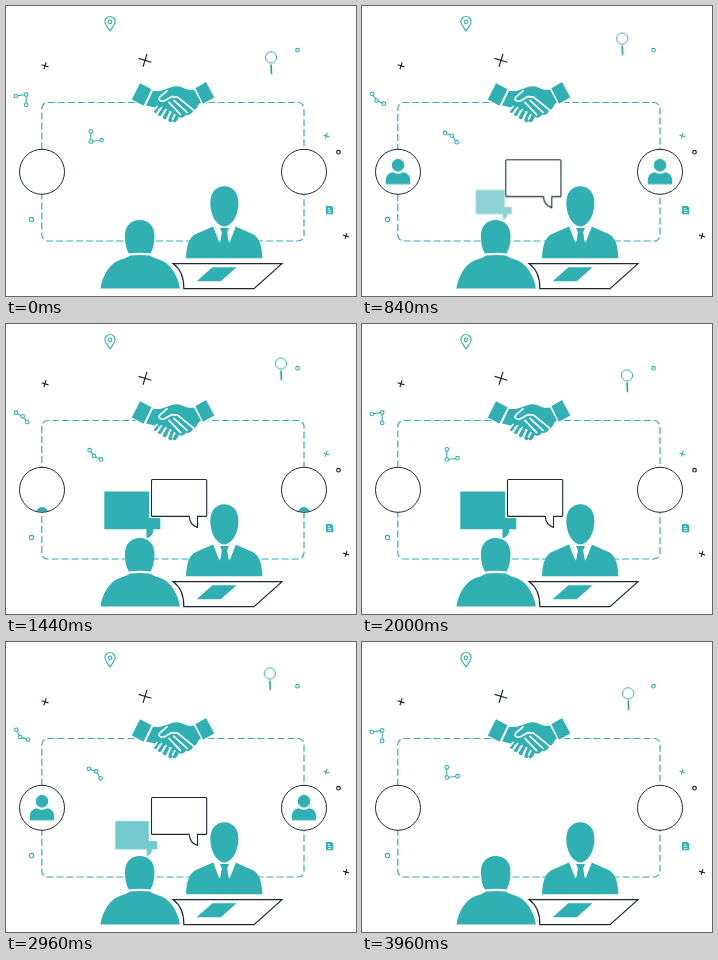
An HTML page for the animation above (4 s loop, 350 by 290 pixels).

```html
<!DOCTYPE html>
<html lang="en">
<head>
<meta charset="utf-8">
<title>Meeting</title>
<style>
  html, body { margin: 0; width: 100%; height: 100%; overflow: hidden; background: #fff; }
  svg { display: block; width: 350px; height: 290px; --teal: #31b0b3; --dark: #1d2a33; }
  .fill { fill: var(--teal); }
  .line { fill: none; stroke: var(--teal); }
  .ink { fill: none; stroke: var(--dark); }
  .white { fill: #fff; }
  .cut { fill: none; stroke: #fff; stroke-width: 1.7; stroke-linecap: round; stroke-linejoin: round; }

  .route { stroke-width: 1.2; stroke-dasharray: 7 3; animation: march 4s linear infinite; }
  @keyframes march { to { stroke-dashoffset: -40px; } }

  .member { animation: rise 2s -80ms cubic-bezier(.37, 0, .63, 1) infinite; }
  @keyframes rise {
    0%, 84%, 100% { transform: translateY(40px); }
    24%, 60% { transform: none; }
  }

  .reply { transform-origin: 141.5px 213.5px; animation: pop 4s cubic-bezier(.37, 0, .63, 1) infinite; }
  @keyframes pop {
    0%, 15.7%, 80.2%, 100% { transform: scale(.2); opacity: 0; }
    25.7%, 70.2% { transform: none; opacity: 1; }
  }

  .speech {
    animation: slide 4s cubic-bezier(.37, 0, .63, 1) infinite, show 4s linear infinite;
  }
  @keyframes slide {
    0%, 11%, 86.5%, 100% { transform: translate(-14px, -14px); }
    24%, 73.5% { transform: none; }
  }
  @keyframes show {
    0%, 11%, 86.5%, 100% { opacity: 0; }
    20%, 77.5% { opacity: 1; }
  }

  .orbit { animation: orbit 2s linear infinite; }
  @keyframes orbit {
    from { transform: translate(265px, 41.4px) rotate(0deg) translateY(10px) rotate(0deg); }
    to { transform: translate(265px, 41.4px) rotate(360deg) translateY(10px) rotate(-360deg); }
  }

  .nodes { marker: url(#node); animation: 1s cubic-bezier(.37, 0, .63, 1) infinite alternate; }
  .nodes.a { animation-name: bend-a; }
  .nodes.b { animation-name: bend-b; }
  @keyframes bend-a {
    from { d: path("M9.8 90 L20.2 88.4 L20.2 98.8"); }
    to { d: path("M10.3 87.8 L14.2 95 L22 97.6"); }
  }
  @keyframes bend-b {
    from { d: path("M84.8 125.3 L84.8 135.5 L95.5 134.2"); }
    to { d: path("M82.8 126.8 L90.2 129.4 L94.6 136.3"); }
  }
</style>
</head>
<body>
<svg viewBox="0 0 350 290">
  <defs>
    <marker id="node" markerUnits="userSpaceOnUse" markerWidth="6" markerHeight="6" refX="3" refY="3">
      <circle cx="3" cy="3" r="1.8" fill="#fff" stroke="#31b0b3" stroke-width="1.1"/>
    </marker>
    <clipPath id="disc"><circle r="22"/></clipPath>
    <path id="cross" d="M-1 0H1M0 -1V1" vector-effect="non-scaling-stroke"/>
    <circle id="ring" r="22.5"/>
    <path id="bust" d="M-6.3 -6.6A6.3 6.3 0 0 1 6.3 -6.6A6.3 6.3 0 0 1 -6.3 -6.6ZM-12.2 12.5V9C-12.2 3 -8 .6 -5 .6Q0 3.2 5 .6C8 .6 12.2 3 12.2 9V12.5Z"/>
  </defs>

  <rect class="line route" x="35.8" y="96.5" width="262.2" height="138.5" rx="6"/>
  <g transform="translate(36 165.8)">
    <use href="#ring" class="white"/>
    <g clip-path="url(#disc)"><g class="member fill"><use href="#bust"/></g></g>
    <use href="#ring" class="ink"/>
  </g>
  <g transform="translate(298 165.8)">
    <use href="#ring" class="white"/>
    <g clip-path="url(#disc)"><g class="member fill"><use href="#bust"/></g></g>
    <use href="#ring" class="ink"/>
  </g>

  <!-- Scattered icons -->
  <g class="line" stroke-width="1.1">
    <path d="M104 25C101.5 21 98.9 18.6 98.9 15.6A5.1 5.1 0 0 1 109.1 15.6C109.1 18.6 106.5 21 104 25Z"/>
    <circle cx="104" cy="15.8" r="1.8"/>
    <circle cx="291.5" cy="44.2" r="1.8"/>
    <circle cx="25.5" cy="213.6" r="2.2"/>
    <use href="#cross" transform="translate(320.3 129.8) rotate(17) scale(3)"/>
    <path class="nodes a" d="M9.8 90L20.2 88.4L20.2 98.8"/>
    <path class="nodes b" d="M84.8 125.3L84.8 135.5L95.5 134.2"/>
  </g>
  <path class="fill" d="M320 200H325.4L327.2 201.8V208.2H320Z"/>
  <path d="M321.8 202.4H324M321.8 204.4H325.4M321.8 206.4H325.4" stroke="#fff" stroke-width=".8"/>
  <g class="ink" stroke-width="1.2">
    <use href="#cross" transform="translate(39 59.8) rotate(17) scale(3.6)"/>
    <use href="#cross" transform="translate(139 54.3) rotate(17) scale(6.7)"/>
    <use href="#cross" transform="translate(340 230) rotate(17) scale(3)"/>
    <circle cx="332.5" cy="146.2" r="1.8"/>
  </g>
  <g class="orbit">
    <circle class="line" r="5.6"/>
    <path d="M.1 7L.5 16.6" stroke="#27999c" stroke-width="1.6"/>
  </g>

  <!-- Handshake -->
  <g transform="translate(0 -.8)">
    <path class="white" d="M133 77L153 82L172 79L200 76L209 93L192 104L166 118L148 107L125 95Z"/>
    <g class="fill">
      <path d="M134 78L145.5 84L137.5 100.5L125.8 94.4Z"/>
      <path d="M189.4 83L200 76.8L208.3 92.4L197 98.6Z"/>
      <path d="M147 85.5C151 86 154 86.4 158.5 84.4C163 83 166 81 171 81C177 81 180 86 188 84.2L195 97.2C191 99 192 104 187 105.2C186 109.4 182 110 180 109.6C178 113 174 113 172 111.4L164 106.6L152 103L140 100.2Z"/>
    </g>
    <path d="M150.6 103.6L149.4 105.6M155.8 105L153.8 108.6M161 107.2L158.8 112M166.2 109.8L164.4 114.8M170.6 112L168.6 115"
          stroke="#31b0b3" stroke-width="4.2" stroke-linecap="round"/>
    <path class="cut" d="M161 85.6L153.4 92.2C152 95.6 156 97 159 95.2L166 91.4L171.6 92L187.6 105M168 95.2L181 107.2M163 97.2L174.6 109.4M147.6 105.6L151 101.2M151.6 108L155.6 102.4M156.4 110.4L160 104.4M161.6 113L164.6 106.6M166.6 114L168.6 109.6"/>
  </g>

  <!-- Speech bubbles -->
  <path class="reply fill" d="M98.3 167.4H143.2V194H154.3V205.2H147.4C147.4 210 145 213.4 140.4 214V205.2H98.3Z"/>
  <path class="speech" fill="#fff" stroke="#1d2a33" stroke-width="1.1" stroke-linejoin="round"
        d="M146.5 155.5H199.7Q200.7 155.5 200.7 156.5V191.4Q200.7 192.4 199.7 192.4H191.5V203.4C186.4 202 183.6 198 183.3 192.4H146.5Q145.5 192.4 145.5 191.4V156.5Q145.5 155.5 146.5 155.5Z"/>

  <!-- Facing person -->
  <g class="fill">
    <path d="M180 252.3C180.6 238 183.4 230.4 191 227.4L207 220.6H229.6L245.4 227.4C253 230.4 255.8 238 256.4 252.3Z"/>
    <path class="white" d="M207 220.3L213.4 236.4L217 232L218.4 236L220 232L223.6 236.4L230 220.3Z"/>
    <path d="M214 222H223L221.2 226.2L222.8 237H214.2L215.8 226.2Z"/>
    <path d="M218.3 180.3C227 180.3 232.4 187 232.4 197C232.4 209 226 220.3 218.3 220.3C210.6 220.3 204.3 209 204.3 197C204.3 187 209.6 180.3 218.3 180.3Z"/>
  </g>

  <!-- Desk -->
  <path class="ink" fill="#fff" stroke-width="1.2" d="M167 257.6H276L248 282.6H177.8C178 272 174.4 263 167 257.6Z"/>
  <path class="fill" d="M190.6 275.2L206.4 261.3H230.6L214.8 275.2Z"/>

  <!-- Seated person -->
  <path class="fill" d="M94.4 282.5C96.4 270 103 258.6 112.5 254.6C117 252.8 121 251.8 124 249.6Q134 248.4 144 249.6C147 251.8 151 252.8 155.6 254.6C165 258.6 172 270 173.9 282.5Z"/>
  <path class="fill" d="M133.7 213.9C143 213.9 148.5 220.4 148.5 230C148.5 237 147.2 243 144.6 247.4Q134 246 122.8 247.4C120.2 243 118.9 237 118.9 230C118.9 220.4 124.4 213.9 133.7 213.9Z"/>
</svg>
</body>
</html>
```
